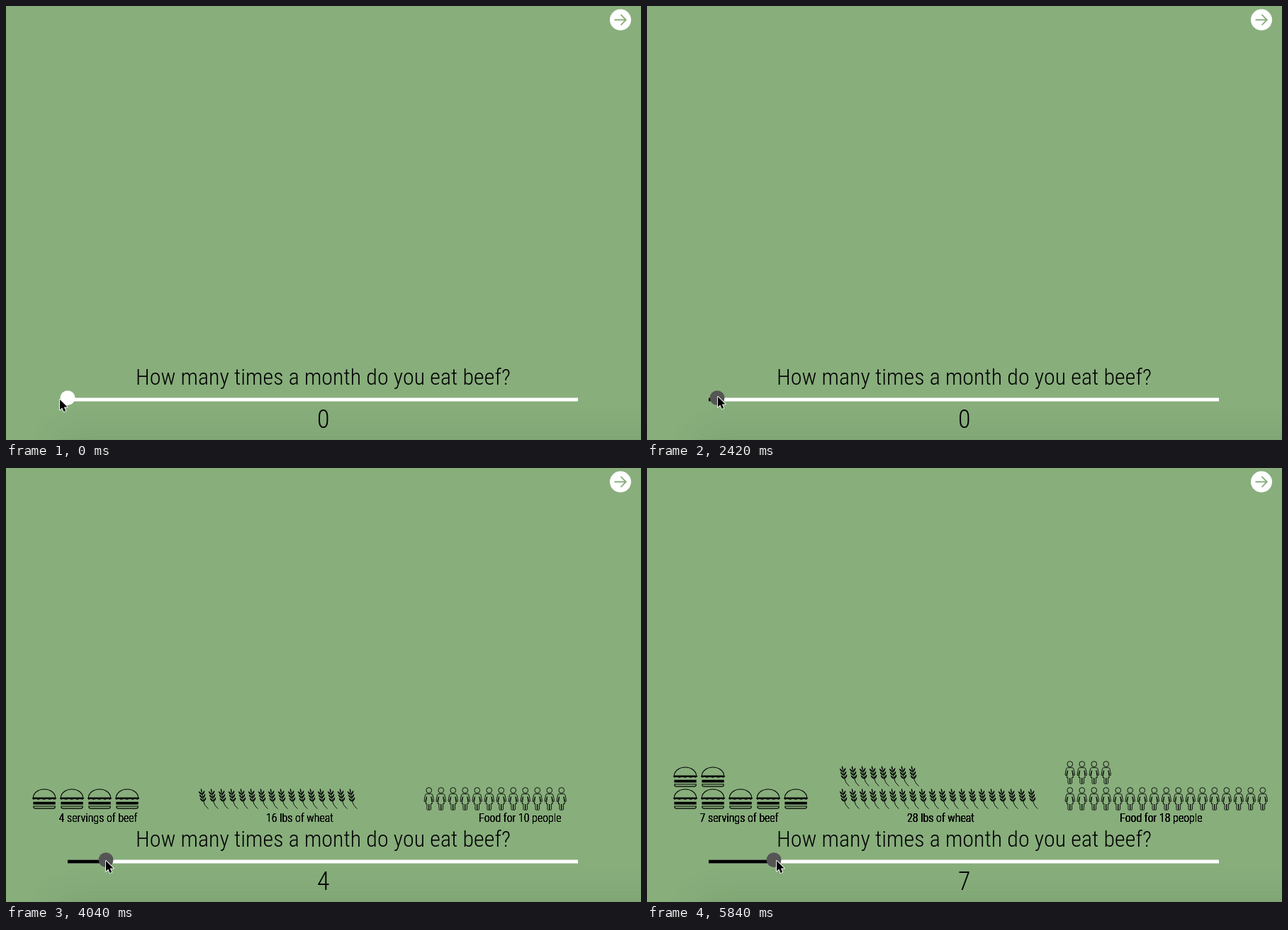
Animation of 896 by 612 pixels, one loop 5.86 s. Source, as an HTML page with a canvas:

```html
<!DOCTYPE html>
<html lang="en">
<head>
<meta charset="utf-8">
<title>Beef slider</title>
<style>
  html, body { margin: 0; width: 100%; height: 100%; overflow: hidden; background: #88ae7c; }
  canvas { display: block; }
</style>
</head>
<body>
<canvas id="stage" width="896" height="612"></canvas>
<script>
const ctx = document.getElementById('stage').getContext('2d');
const LOOP = 5860, PRESS = 1280;
const GREEN = '#88ae7c';
const TRACK = { left: 87, right: 807, top: 552.5, height: 5, step: 12.1 };
const FAMILY = '"Roboto Condensed", Roboto, sans-serif';

// [time, position] pairs
const THUMB = [[1280, 89], [1740, 89], [2300, 97.5], [2420, 99], [3400, 124], [4040, 141], [5200, 166], [5840, 179]];
const CURSOR_X = [[0, 76], [20, 76], [300, 89], [1740, 89], [2420, 100], [3400, 127], [4040, 141], [5200, 169], [5840, 183]];
const CURSOR_Y = [[0, 555], [20, 555], [300, 551], [1740, 551], [2420, 551], [3400, 554], [5860, 554]];

function at(keys, t) {
  if (t <= keys[0][0]) return keys[0][1];
  for (let i = 1; i < keys.length; i++) {
    const [t0, a] = keys[i - 1], [t1, b] = keys[i];
    if (t <= t1) return a + (b - a) * (t - t0) / (t1 - t0);
  }
  return keys[keys.length - 1][1];
}

function text(str, x, y, size) {
  ctx.font = `300 condensed ${size}px ${FAMILY}`;
  ctx.textAlign = 'center';
  ctx.fillStyle = '#000';
  ctx.fillText(str, x, y);
}

function disc(x, y, r, color) {
  ctx.fillStyle = color;
  ctx.beginPath();
  ctx.arc(x, y, r, 0, Math.PI * 2);
  ctx.fill();
}

const bunLines = new Path2D(
  'M1.700 12.500A15.600 12 0 0 1 32.900 12.500' +
  'M2.200 24.500H32.500V25.500Q32.500 27.600 30 27.600H4.700Q2.200 27.600 2.200 25.500Z');
const filling = new Path2D(
  'M0 13Q2 11.500 5 12H29Q32 11.500 35 13L32 15.300L29 14.300L25 15.300L21 14.300L17 15.300L13 14.300L9 15.300L5 14.300L2 15.300Z' +
  'M1.700 18.300H33V22H1.700Z');

function burger() {
  ctx.lineWidth = 1.1;
  ctx.stroke(bunLines);
  ctx.fill(filling);
}

const stalk = new Path2D('M4.500 4L7.300 18C8.300 22.500 10 25 14 28.500');
const grain = new Path2D('M0 0C-2.600 -.8 -4.400 -2.800 -4.300 -5.800C-2.300 -4.900 -.7 -2.800 0 0Z');

function wheat() {
  ctx.lineWidth = 0.9;
  ctx.stroke(stalk);
  for (let i = 0; i < 3; i++) {
    for (const side of [1, -1]) {
      ctx.save();
      ctx.translate(5.2 + i * 0.95, 9 + i * 4.8);
      ctx.rotate(-0.12);
      ctx.scale(side, 1);
      ctx.fill(grain);
      ctx.restore();
    }
  }
  ctx.beginPath();
  ctx.ellipse(4.2, 2.6, 0.8, 2.4, -0.2, 0, Math.PI * 2);
  ctx.fill();
}

const halfBody = new Path2D(
  'M0 9.600H3Q4.900 9.700 5.300 11.600L6.700 19.300Q6.500 21.300 5.300 20.500L3.100 13.500L4.500 23.500H2.800V31.500Q1.400 33.200 0 31.800V24');

function person() {
  ctx.lineWidth = 0.9;
  ctx.beginPath();
  ctx.arc(0, 4.5, 3.9, 0, Math.PI * 2);
  ctx.stroke();
  ctx.stroke(halfBody);
  ctx.scale(-1, 1);
  ctx.stroke(halfBody);
}

const GROUPS = [
  { icon: burger, each: 1, perRow: 5, x: 36.7, y: 452.5, dx: 39, dy: 31, labelX: 130, label: n => `${n} servings of beef` },
  { icon: wheat, each: 4, perRow: 20, x: 271.5, y: 452, dx: 14, dy: 32, labelX: 414.5, label: n => `${n * 4} lbs of wheat` },
  { icon: person, each: 3, perRow: 17, x: 596.8, y: 450, dx: 17, dy: 37, labelX: 725.3, label: n => `Food for ${Math.round(n * 2.5)} people` }
];

function drawGroup(g, n) {
  ctx.fillStyle = ctx.strokeStyle = '#000';
  for (let i = 0; i < n * g.each; i++) {
    ctx.save();
    ctx.translate(g.x + (i % g.perRow) * g.dx, g.y - Math.floor(i / g.perRow) * g.dy);
    g.icon();
    ctx.restore();
  }
  // Repeated drawing makes the label darker as the count rises
  for (let i = 0; i < n; i++) text(g.label(n), g.labelX, 499, 16);
}

function drawBackground() {
  ctx.fillStyle = GREEN;
  ctx.fillRect(0, 0, 896, 612);
  // Soft shadow rising from below the lower edge
  ctx.save();
  ctx.shadowColor = 'rgba(50,80,45,.16)';
  ctx.shadowBlur = 50;
  ctx.fillStyle = '#7d9f73';
  ctx.fillRect(75, 611, 900, 80);
  ctx.restore();
}

function drawNextButton() {
  disc(867, 19.5, 15, '#fff');
  ctx.strokeStyle = GREEN;
  ctx.lineWidth = 1.8;
  ctx.stroke(new Path2D('M858.500 19.500H875M867.500 12.200L874.800 19.500L867.500 26.800'));
}

function drawSlider(x, pressed) {
  ctx.fillStyle = '#fff';
  ctx.fillRect(TRACK.left, TRACK.top, TRACK.right - TRACK.left, TRACK.height);
  if (pressed) {
    ctx.fillStyle = '#000';
    ctx.fillRect(TRACK.left, TRACK.top, x - TRACK.left, TRACK.height);
  }
  disc(x, 552.7, 10.4, pressed ? '#555' : '#fff');
}

const pointer = new Path2D('M0 0V14.500L3.300 11.500L5.600 17L8.200 15.900L5.900 10.500H10.600Z');

function drawCursor(x, y) {
  ctx.save();
  ctx.translate(x, y);
  ctx.lineJoin = 'round';
  ctx.strokeStyle = '#fff';
  ctx.lineWidth = 1.8;
  ctx.stroke(pointer);
  ctx.fillStyle = '#000';
  ctx.fill(pointer);
  ctx.restore();
}

function draw(t) {
  const pressed = t >= PRESS;
  const x = pressed ? at(THUMB, t) : TRACK.left;
  const count = Math.floor((x - TRACK.left) / TRACK.step);
  drawBackground();
  drawNextButton();
  for (const g of GROUPS) drawGroup(g, count);
  text('How many times a month do you eat beef?', 447.5, 534, 32);
  drawSlider(x, pressed);
  text(String(count), 447.7, 595, 36);
  drawCursor(Math.round(at(CURSOR_X, t)), Math.round(at(CURSOR_Y, t)));
}

const start = performance.now();
function frame() {
  draw((performance.now() - start) % LOOP);
  requestAnimationFrame(frame);
}
frame();
</script>
</body>
</html>
```
